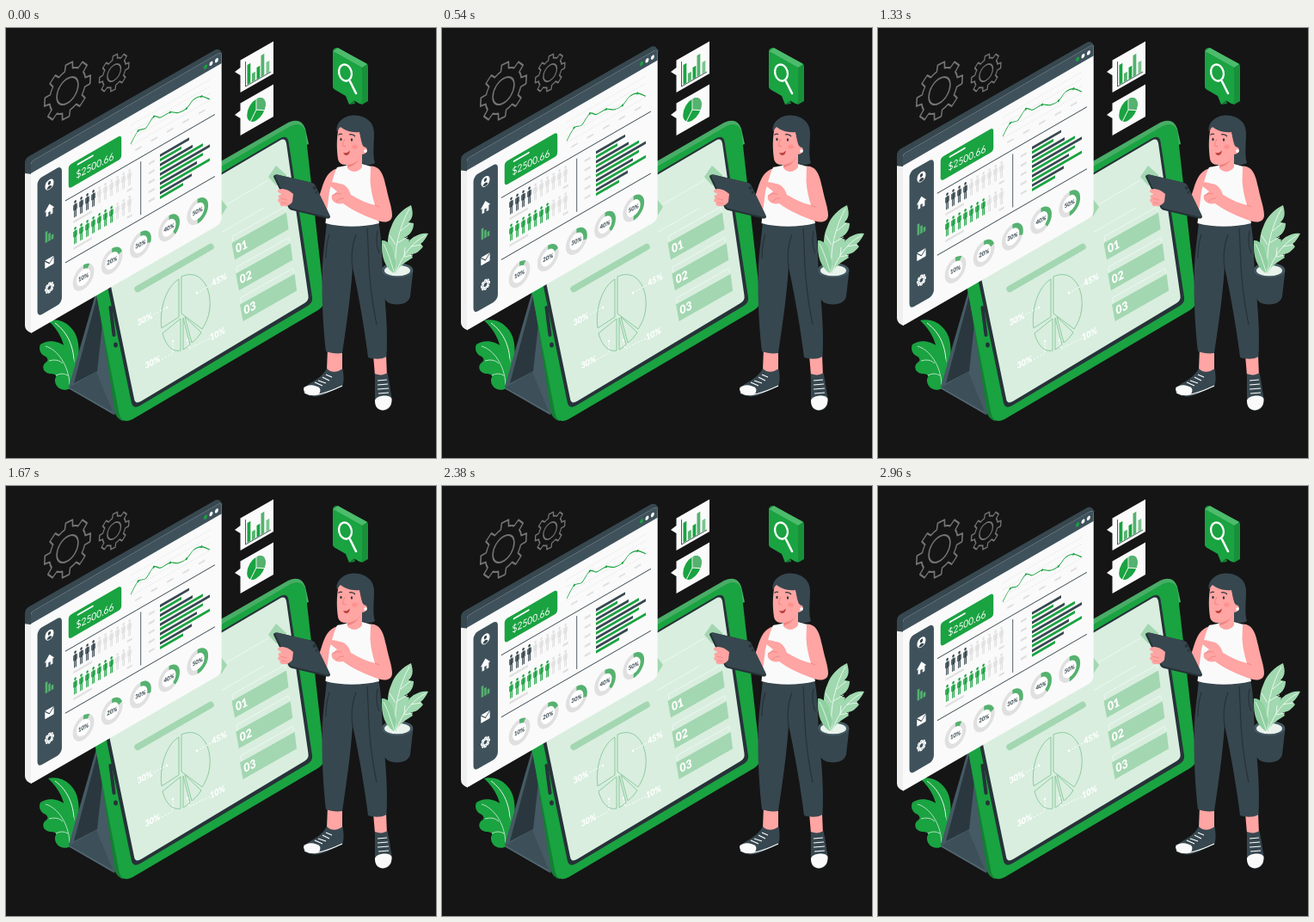
Recreate the animation shown at these times as an HTML page with a canvas. Size 500 by 500 pixels, loop 3000 ms.

```html
<!DOCTYPE html>
<html lang="en">
<head>
<meta charset="utf-8">
<title>Analytics dashboard</title>
<style>
html, body { margin: 0; width: 100%; height: 100%; overflow: hidden; background: #151515; }
canvas { display: block; width: 500px; height: 500px; }
</style>
</head>
<body>
<canvas id="stage" width="500" height="500"></canvas>
<script>
const ctx = document.getElementById('stage').getContext('2d');
const LOOP = 3000, LIFT = 10;
const GREEN = '#1aa341', DEEP = '#147f34', MID = '#55b26f', PALE = '#a3d7b1', MINT = '#d9eedf';
const SLATE = '#37474f', STEEL = '#455a64', INK = '#263238', GREY = '#e0e0e0', WHITE = '#fff', PAPER = '#fafafa';
const SKIN = '#ffa5a3', SHADE = '#ee8582';
const TAU = Math.PI * 2;

function paint(fill, stroke, w = 1) {
  if (fill) { ctx.fillStyle = fill; ctx.fill(); }
  if (stroke) { ctx.strokeStyle = stroke; ctx.lineWidth = w; ctx.stroke(); }
}
function shape(d, fill, stroke, w = 1) {
  const p = new Path2D(d);
  if (fill) { ctx.fillStyle = fill; ctx.fill(p); }
  if (stroke) { ctx.strokeStyle = stroke; ctx.lineWidth = w; ctx.stroke(p); }
}
function rect(x, y, w, h, r, fill, stroke, lw) {
  ctx.beginPath(); ctx.roundRect(x, y, w, h, r); paint(fill, stroke, lw);
}
function oval(x, y, rx, ry, fill, stroke, w, rot = 0) {
  ctx.beginPath(); ctx.ellipse(x, y, rx, ry, rot, 0, TAU); paint(fill, stroke, w);
}
// Text sits a little flatter than the plane it is drawn on.
function text(s, x, y, size, color, weight = 400) {
  ctx.save();
  ctx.transform(1, 0.06, 0, 1, x, y);
  ctx.font = `${weight} ${size}px Lato, sans-serif`;
  ctx.textAlign = 'center';
  ctx.textBaseline = 'middle';
  ctx.fillStyle = color;
  ctx.fillText(s, 0, 0);
  ctx.restore();
}
// Runs draw() inside a skewed plane anchored at x, y.
function plane(x, y, draw, skew = 0) {
  ctx.save();
  ctx.transform(0.866, -0.5, skew, 1, x, y);
  draw();
  ctx.restore();
}
function dashed(pattern, d, color, w) {
  ctx.setLineDash(pattern);
  shape(d, null, color, w);
  ctx.setLineDash([]);
}
// Smooth curve through all points.
function spline(pts) {
  ctx.beginPath();
  ctx.moveTo(...pts[0]);
  for (let i = 1; i < pts.length; i++) {
    const a = pts[i - 1], b = pts[i], p = pts[i - 2] || a, n = pts[i + 1] || b;
    ctx.bezierCurveTo(a[0] + (b[0] - p[0]) / 6, a[1] + (b[1] - p[1]) / 6,
      b[0] - (n[0] - a[0]) / 6, b[1] - (n[1] - a[1]) / 6, b[0], b[1]);
  }
}

function gear(r, hole, teeth, turn, color, w) {
  const step = TAU / teeth, root = r * 0.78;
  ctx.beginPath();
  for (let i = 0; i < teeth; i++) {
    const a = turn + i * step;
    for (const [off, rad] of [[-0.22, root], [-0.15, r], [0.15, r], [0.22, root]])
      ctx.lineTo(rad * Math.cos(a + off), rad * Math.sin(a + off));
    ctx.arc(0, 0, root, a + 0.22, a + step - 0.22);
  }
  ctx.closePath();
  paint(null, color, w);
  oval(0, 0, hole, hole, null, color, w);
}

function drawGears() {
  plane(71.5, 73, () => gear(31, 14.3, 8, -0.714, '#737373', 1.9));
  plane(125.7, 52, () => gear(20, 9, 8, -0.714, '#737373', 1.6));
}

function drawLeaf() {
  shape('M49 340 C66 336 82 349 84 367 C86 381 83 393 78 402 L69 386 C70 368 62 352 49 340Z', GREEN);
  shape('M57 343 C72 354 80 372 79 394', null, '#e5f4e9', 1);
  shape('M40 368 C48 362 61 363 70 371 C79 380 83 396 81 407 L75 419 C66 424 56 418 57 408 C60 404 57 402 51 402 C43 401 41 393 46 389 C50 387 49 383 44 381 C39 378 38 372 40 368Z', GREEN);
  shape('M46 370 C60 374 73 392 74 415 M50 387 Q60 384 66 390 M58 404 Q65 400 72 404', null, '#c6e8cf', 0.9);
}

function drawStand() {
  shape('M105 306 L73 417 L74 420 L126 450 L132 440 L112 320Z', STEEL);
  shape('M106 312 L79 413 L106 399 L112 345Z', '#2a373e');
  shape('M74 418 L105 400 L124 446Z', '#3d4f58');
  shape('M74 419 L124 448', null, '#5a6d77', 1);
}

function drawTablet() {
  shape('M90 205 L100 200 L137 457 Q128 455 126.500 446Z', DEEP);
  shape('M95 244 L328 110 Q343 103 348 117 L352 135 L250 170Z', '#48ad66');
  shape('M94 252 L331 114 Q343 108 348 119 L370 314 Q371 323 363 328 L147 455 Q134 461 131.500 448Z', GREEN);
  shape('M108 252 L319 128 Q327 124 328.500 132 L356 313 Q357 319 351 323 L156 439 Q147 444 145.500 434Z', INK);
  shape('M112 252 L318 131 Q324.500 127 326 134 L351.500 311 Q352.500 317 347 320 L157 434 Q150 438 149 431Z', MINT);
  ctx.lineCap = 'round';
  shape('M121.500 325 L125.500 357', null, INK, 4);
  oval(127.500, 368.500, 2.4, 3, INK);

  shape('M153 303.500 L238 254.500', null, PALE, 7.5);
  ctx.lineCap = 'butt';

  // faint upper chart
  shape('M250 199 L257 208 L250 219Z M305 173 L314 160 L326 171 L327 180 L314 183Z', PALE);
  shape('M257 205 L305 177 M250 238 L300 209', null, '#eef8f1', 1);

  // split pie
  shape('M204 289 C226 279 239 302 237 325 C236 336 232 344 228 350 L204 332Z'
    + 'M201 292 C186 301 178 327 181 349 L201 336Z'
    + 'M182 355 L203 338 L203 375 C194 377 186 370 182 355Z'
    + 'M206 337 L214 368 Q210 372 206 374Z M208 336 L227 354 Q222 362 216 366Z', null, '#8bcb9d');

  const label = (s, x, y, size = 10) =>
    plane(x, y, () => text(s, 0, 0, size, WHITE, 900), 0.14);
  label('30%', 161.500, 339);
  label('45%', 248, 293);
  label('30%', 170.500, 389);
  label('10%', 246, 356);
  dashed([2, 2], 'M172 333 L187 325 M222 308 L238 299 M181 385 L194 378 L194 364 M237 361 L213 373 L211 363', WHITE, 1);
  for (const [x, y] of [[187, 325], [222, 308], [194, 364], [211, 363]]) oval(x, y, 1.2, 1.5, WHITE);

  ['01', '02', '03'].forEach((s, i) => {
    ctx.save();
    ctx.translate(i * 4.8, i * 35.7);
    shape('M262.500 250 L326 214.500 L328.500 234 L266 269.500Z', PALE);
    shape('M264 248 L263 242.500 L324 208 L325 213', null, '#f0f9f3', 0.9);
    label(s, 274, 254.500, 13.5);
    ctx.restore();
  });
}

function person(u, v, color) {
  oval(u, v - 8.3, 1.5, 1.6, color);
  rect(u - 1.6, v - 6, 3.2, 7.5, 1, color);
  rect(u - 2.9, v - 5.5, 0.9, 6.5, 0.4, color);
  rect(u + 2, v - 5.5, 0.9, 6.5, 0.4, color);
  rect(u - 1.6, v, 1.3, 9.5, 0.5, color);
  rect(u + 0.3, v, 1.3, 9.5, 0.5, color);
}

function drawIcons() {
  const u = 24.8;
  oval(u, 194.4, 5.8, 5.8, WHITE);
  oval(u, 192.6, 2, 2, SLATE);
  shape(`M${u - 3.6} 198 Q${u} 193.500 ${u + 3.6} 198 Q${u} 201 ${u - 3.6} 198Z`, SLATE);
  shape(`M${u - 6.5} 224 L${u} 217 L${u + 6.5} 224 L${u + 4.5} 224 V230 H${u + 1.4} V226 H${u - 1.4} V230 H${u - 4.5} V224Z`, WHITE);
  rect(u - 5.5, 247, 3, 13, 0, MID);
  rect(u - 1.5, 251, 3, 9, 0, MID);
  rect(u + 2.5, 254.500, 3, 5.5, 0, MID);
  rect(u - 6, 280, 12, 9.5, 1, WHITE);
  shape(`M${u - 6} 280.500 L${u} 286 L${u + 6} 280.500`, null, SLATE, 1);
  ctx.save();
  ctx.translate(u, 314.4);
  gear(5.6, 3, 8, 0, WHITE, 1.5);
  ctx.restore();
}

function drawFace() {
  rect(0, 155.500, 256, 199.500, [3, 5, 6, 3], PAPER);
  rect(0, 155.500, 256, 13.500, [3, 5, 0, 0], '#3f525c');
  [GREEN, WHITE, WHITE].forEach((c, i) => oval(234.500 + i * 7.4, 162.3, 2.3, 2.4, c));

  rect(8.7, 180.500, 32.8, 159.800, 6, '#3f525c');
  drawIcons();

  rect(50.500, 185, 71, 27.500, 4, GREEN);
  rect(62, 189, 22, 2, 1, WHITE);
  text('$2500.66', 86, 203.4, 11.8, WHITE);

  // trend line
  for (const v of [180, 188, 196, 204])
    dashed([1, 1.6], `M134 ${v} H241`, '#d0d0d0', 0.6);
  const trend = [[134, 202], [144, 191.500], [154, 193.500], [165, 185.500], [174, 191],
    [187, 191.500], [198, 197.500], [209, 198], [218, 192.500], [229, 194], [240, 203]];
  spline(trend);
  paint(null, GREEN, 1);
  for (const i of [1, 3, 5, 7, 9]) oval(trend[i][0], trend[i][1], 1.3, 1.3, GREEN);
  for (let i = 0; i < 5; i++) rect(140 + i * 21.3, 211, 8.5, 2.2, 0, GREY);

  shape('M46 224 H247 M46 296 H247 M147.500 229 V291', null, SLATE, 1);

  // people rows
  [[240, 4, SLATE], [271, 7, GREEN]].forEach(([v, count, color]) => {
    for (let i = 0; i < 10; i++) person(59.500 + i * 8.1, v, i < count ? color : GREY);
    rect(57, v + 13, 25, 2.6, 0, GREY);
    rect(129, v + 13, 7, 2.6, 0, GREY);
  });

  // paired bars, ends given on screen x
  [[213, 204], [217, 229], [237, 229], [222, 237], [216, 206]].forEach((ends, i) => {
    const v = 233.500 + i * 10.9;
    ends.forEach((x, j) => rect(173.2, v + j * 5.2, (x - 179) / 0.866, 3.2, 0, j ? GREEN : SLATE));
    rect(158, v + 2.5, 8, 2.6, 0, GREY);
  });

  for (let i = 0; i < 5; i++) {
    const u = 70.500 + i * 38.3, v = 325;
    oval(u, v, 11.8, 11.8, WHITE, GREY, 5);
    ctx.beginPath();
    ctx.arc(u, v, 11.8, -TAU / 4, -TAU / 4 + TAU * (i + 1) / 10);
    paint(null, MID, 5);
    text((i + 1) * 10 + '%', u, v + 0.3, 7, SLATE, 800);
  }
}

function drawPanel(dy) {
  ctx.save();
  ctx.translate(0, dy);
  shape('M22 160 L30 160 L30 355 Q22 352 22 346Z', '#f0f0f0');
  shape('M22 169 V157 Q22 152 26 149.500 L243 25.500 Q246 24 249 26 L252 30 L30 160 V170Z', SLATE);
  plane(29, 0, drawFace);
  ctx.restore();
}

function drawCards() {
  for (const dy of [0, 50]) {
    ctx.save();
    ctx.translate(0, dy);
    shape('M272.500 37.500 L311 15.500 V53 L272.500 75 V55 L266 51 L272.500 46Z', PAPER);
    ctx.restore();
  }
  shape('M278.500 39 V68 L308 51', null, SLATE, 0.9);
  [[280.500, 43, 66], [286, 53, 63], [291.500, 46, 60], [296.500, 32, 57], [302.500, 40, 53.500]].forEach(([x, t, b], i) =>
    shape(`M${x} ${t} L${x + 3.8} ${t - 2.2} V${b - 2.2} L${x} ${b}Z`, i > 3 ? '#7cc48f' : i % 2 ? MID : GREEN));
  plane(291, 95, () => {
    oval(0, 0, 12.4, 12.4, GREEN);
    ctx.beginPath();
    ctx.moveTo(0, 0);
    ctx.arc(0, 0, 12.4, -1.5, 0.5);
    ctx.closePath();
    paint(MID);
    shape('M0 -13 V0 L11.500 6.500 M0 0 L-8 10', null, PAPER, 1.1);
  });
}

function drawSearch() {
  shape('M380 28 Q380 23 385 23 L419 41 Q421 42 421 45 V85 L414 89 L380 69Z', '#18903a');
  shape('M380 27 L386 23 L420 42 L414 46Z', '#4dbb6c');
  shape('M382 28 L412 45 Q414 46 414 49 V86 Q414 89 411 88 L405 84.500 L399 89 L395 79 L382 71.500 Q380 70 380 67 V29 Q380 27 382 28Z', GREEN);
  shape('M405 84.500 L399 89 L406 88Z', DEEP);
  oval(394.500, 52, 7.3, 9.6, null, WHITE, 2.3, -0.25);
  ctx.lineCap = 'round';
  shape('M400 62 L407 76', null, WHITE, 2.6);
  ctx.lineCap = 'butt';
}

function drawPlant() {
  shape('M437 283 L439 312 Q441 321 454 321.500 Q468 321 470 312 L473.500 282Z', SLATE);
  oval(455, 281.500, 18.3, 8.6, STEEL);
  oval(455, 282, 15, 6.3, '#e9f3ec');
  const leaf = '#a0d8af', vein = '#f1faf4';
  shape('M453 284 C442 262 442 244 448 231 C452 219 461 211 471 206 C474 216 473 221 468 226 L474 227 C474 236 469 241 463 244 L469 246 C466 257 459 265 453 284Z', leaf);
  shape('M453 282 C451 258 457 232 469 210 M453 252 L446 241 M455 250 L467 243 M459 236 L470 227', null, vein, 0.9);
  shape('M451 285 C441 279 436 267 437 247 C446 247 450 255 451 264 C454 270 454 278 451 285Z', '#8fcfa0');
  shape('M451 283 C447 270 443 258 439 251', null, vein, 0.8);
  shape('M453 286 C456 266 463 251 474 243 C481 239 486 238 491 239 C488 245 485 249 482 251 L485 254 C480 261 475 263 471 263 L473 267 C464 273 458 275 453 286Z', leaf);
  shape('M454 284 C460 266 471 250 488 241 M463 266 L473 264 M471 254 L483 252 M463 265 L464 255', null, vein, 0.9);
}

function drawShoes() {
  shape('M374 372 L391 374 L391 402 Q380 405 373 398Z M427 380 L442 380 L443 404 Q436 407 429 404Z', SKIN);
  shape('M373 396 C379 402 386 400 391.500 396 C393 405 393 412 391 417 C381 420 373 427 361 428.500 C351 429 345 425 346 419 C352 412 365 410 373 396Z', SLATE);
  shape('M346 419 C350 414 359 414 365 419 Q367 424 361 427 C352 428 346 425 346 419Z', PAPER);
  shape('M347 424 C358 430 374 424 391 416', null, WHITE, 1.1);
  shape('M372 403 L379 406 M368 406 L376 410 M363 410 L372 413 M359 412 L368 416', null, WHITE, 1.2);
  shape('M429 402 C434 404 439 404 443.500 401 C446 412 447 422 448.500 430 C449 440 445 445 438 445 C431 444 428 438 429 430Z', SLATE);
  shape('M429 433 C430 427 446 425 448.500 431 C449 439 445 444 438 444.500 C431 444 429 439 429 433Z', PAPER);
  shape('M432 410 L443 409 M432 415 L444 414 M432 420 L445 419 M433 425 L445 424', null, WHITE, 1.2);
}

function drawHead() {
  shape('M386 122 C383 110 393 101.500 405 101.500 C419 102 428 110 428 122 C428 136 426 148 429 157 C421 161 413 159 409 152 L398 125Z', SLATE);
  shape('M397 148 V163 C402 169 409 168 414 162 V142Z', SKIN);
  shape('M397 157 Q407 156 412 147 L412 151 Q406 161 397 162Z', SHADE);
  shape('M387 115 C384 128 384.500 142 386 152 C387 159 394 160 400 158.500 C407 157 412 153 414 147 C421 147 422 138 415 137 L411 120 C403 114 394 113 387 115Z', SKIN);
  shape('M385 121 C382 108 396 101 408 102 C420 104 427 112 427 124 L418 139 C413 137 413 129 411 121 C402 122 394 119 389 115 Q386 117 385 121Z', SLATE);
  oval(418, 143, 1.8, 1.9, WHITE);
  oval(389.500, 129.500, 1.1, 1.7, INK);
  oval(402, 130, 1.1, 1.7, INK);
  shape('M386.500 124.500 Q388 122.500 391 123.500 M399 124 Q403 122.500 406 126', null, INK, 1.2);
  shape('M394 129 Q391 134 391.500 137 L395 138', null, SHADE, 1);
  shape('M392 145 Q397 146 400 142.500 Q399 148.500 395 148 Q393 147.500 392 145Z', '#b9413f');
  oval(405.500, 138, 3.2, 2.6, '#ff918f');
}

function drawWoman() {
  drawShoes();
  shape('M373 226 C390 231 415 231 433 224 C437 245 437 262 438 290 C442 325 444 355 442.500 382 C436 386 427 385 421 383 C417 350 410 310 403 278 C401 310 396 345 391 378 C384 379 378 378 372 376 C368 340 366 295 369 262Z', SLATE);
  shape('M403 280 C401 265 403 250 407 240 M420 233 C422 260 420 290 431 345 M376 240 Q372 252 372 268 M432 236 Q429 250 434 262', null, INK, 1.2);

  shape('M386 163 C375 166 371 174 367 187 L363 199 L372 217 C378 208 382 196 383 185Z', SKIN);
  shape('M385 162 C391 161 396 160 398 158.500 C402 165 410 165 414 158 L428 162 L428 188 C429 202 431 214 434 227 C414 232 390 232 371.500 227 C373 212 375 200 376 190 C379 180 381 170 385 162Z', PAPER);

  // held tablet
  shape('M311 173 Q311 170 315 170.500 L356 180 Q359 181 360 184 L377 219 Q377 222 373 221.500 L333 212 Q329 211 328 208Z', INK);
  shape('M313 172 Q313 170 316 170.500 L356 180 Q359 181 360 184 L376 217 Q377 220 373 219.500 L334 210 Q330 209 329 206Z', SLATE);
  oval(358.500, 186, 1.7, 2, INK);
  oval(361, 191, 1.2, 1.5, INK);
  shape('M334 193 C328 187 319 185 316 189 C315 191 319 192 322 194 C317 193 315 196 318 198 C315 199 316 203 319 203 C317 205 320 208 323 207 C327 208 331 205 333 202Z', SKIN);
  shape('M319 198 L327 200 M320 203 L327 204', null, SHADE, 0.7);

  // pointing arm
  shape('M424 160.500 C436 161 439 171 442 185 C445 200 449 209 449 218 C448.500 226 441 226.500 434 224.500 C418 219 404 213 392 204 C383 206 377 200 379 195 L385 190 L376 183 C374 179 379 178 388 181 C396 182 399 188 401 194 C410 199 420 204 429 206 C426 196 424 187 423.500 178Z', SKIN);
  shape('M429 206 L434 208 M379 195 Q384 191 390 193 M384 202 Q388 197 393 198', null, SHADE, 0.9);
  drawHead();
}

function frame(now) {
  const p = (now % LOOP) / LOOP;
  const lift = -LIFT * (1 - Math.abs(1 - 2 * p));
  ctx.fillStyle = '#151515';
  ctx.fillRect(0, 0, 500, 500);
  ctx.lineJoin = 'round';
  drawGears();
  drawLeaf();
  drawStand();
  drawTablet();
  drawPanel(lift);
  drawCards();
  drawSearch();
  drawPlant();
  drawWoman();
}

const start = performance.now();
function tick() {
  frame(performance.now() - start);
  requestAnimationFrame(tick);
}
tick();
</script>
</body>
</html>
```
